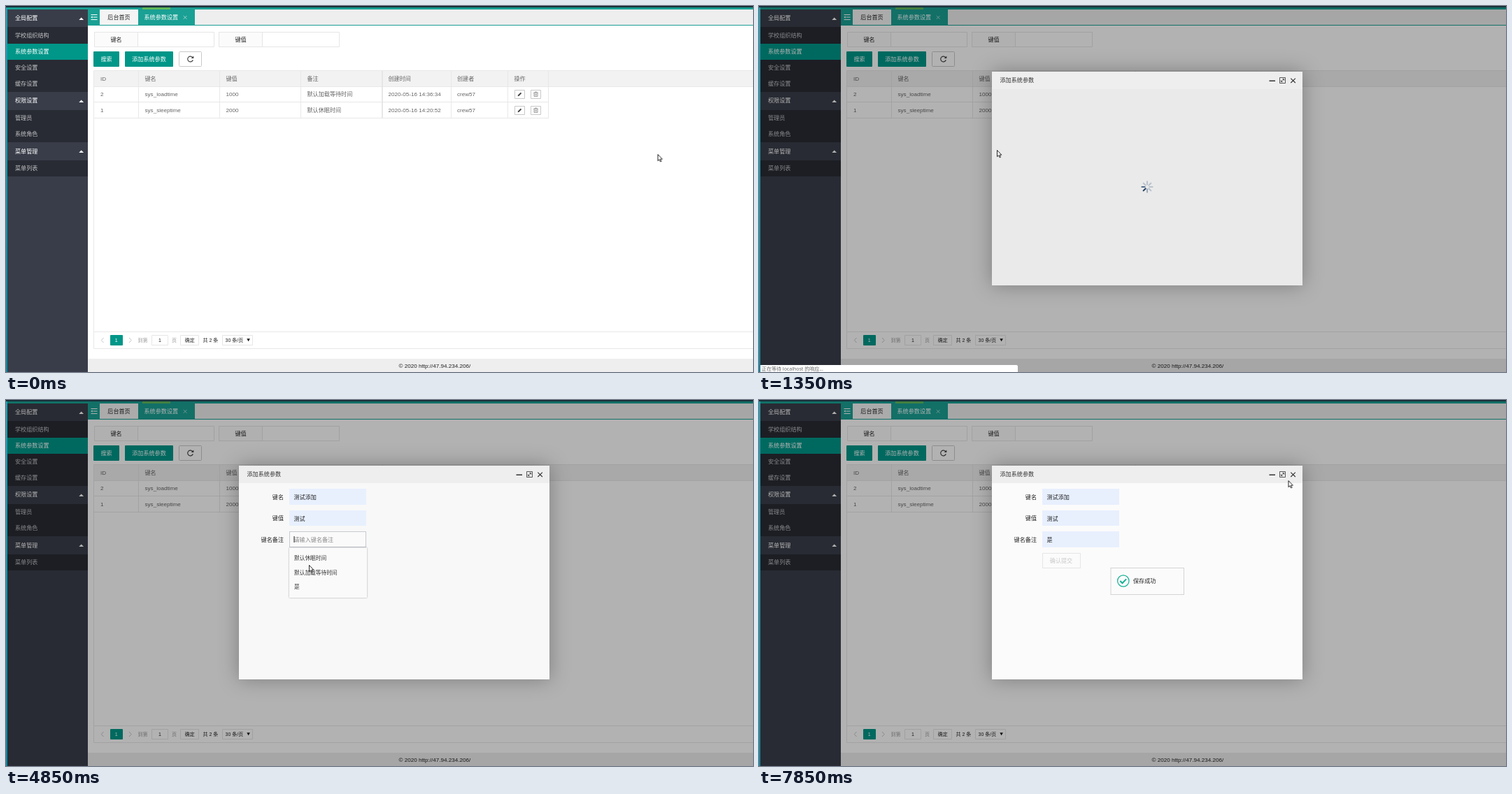
Write an HTML page that moves like this. It is 1068x524 px and loops after 8 s.

```html
<!DOCTYPE html>
<html lang="zh-CN">
<head>
<meta charset="utf-8">
<title>系统参数设置</title>
<style>
html, body { margin: 0; width: 100%; height: 100%; overflow: hidden; background: #fff; }
svg { display: block; width: 1068px; height: 524px; }
text { font: 8.1px "Liberation Sans", "Noto Sans CJK SC", "Noto Sans CJK", sans-serif; fill: #666; white-space: pre; }
.m { text-anchor: middle; }
.e { text-anchor: end; }
.b { font-weight: 500; }
.w text, text.w { fill: #fff; }
.k text, text.k { fill: #222; }
.sub text { fill: #c2c3c6; }
.sm text { font-size: 7px; }
.ph { fill: #8a8a8a; }
.ui text { font-family: "Noto Sans", "Noto Sans CJK SC", "Noto Sans CJK", sans-serif; font-size: 7.7px; fill: #333; }
.box { fill: #fff; stroke: #e6e6e6; }
.teal { fill: #009688; }
.line { fill: none; stroke: #e8e8e8; }
.auto { fill: #e8f0fe; }
.focus { fill: none; stroke: #c6cad0; }
.caret { fill: #222; }
.pop { fill: #fafafa; filter: drop-shadow(0 .6px 1px rgba(0,0,0,.35)); }
.pick { fill: #e9e9e9; }
.ico { fill: none; stroke: #333; stroke-width: 1.1; }

.t { opacity: 0; animation: 8s step-end infinite; }
#mask { animation-name: mask; }
#dialog { transform-origin: 555px 247px; animation-name: dialog; }
#wait, #status { animation-name: wait; }
#form { animation-name: form; }
#row { animation-name: row; }
#add { animation: add 8s step-end infinite; }
#drop1 { animation-name: drop1; }
#caret1 { animation-name: caret1; }
#pick1 { animation-name: pick1; }
#fill1 { animation-name: fill1; }
#drop2 { animation-name: drop2; }
#caret2 { animation-name: caret2; }
#pick2 { animation-name: pick2; }
#fill2 { animation-name: fill2; }
#drop3 { animation-name: drop3; }
#focus3 { animation-name: focus3; }
#caret3 { animation-name: caret3; }
#caret4 { animation-name: caret4; }
#pick3 { animation-name: pick3; }
#fill3 { animation-name: fill3; }
#submit { animation: submit 8s step-end infinite; }
#sent { animation-name: sent; }
#toast { animation-name: toast; }
#cursor { animation: move 8s step-end infinite; }
#arrow { animation: arrow 8s step-end infinite; }
#hand { animation-name: hand; }
#beam { animation-name: beam; }

@keyframes mask { 13.75% { opacity: 1 } 100% { opacity: 1 } }
@keyframes dialog {
  13.75% { opacity: .8; transform: scale(.87) }
  16.875%, 100% { opacity: 1; transform: scale(1) }
}
@keyframes wait { 13.75% { opacity: 1 } 20% { opacity: 0 } }
@keyframes form { 20%, 100% { opacity: 1 } }
@keyframes row { 7.5% { opacity: 1 } 10.625% { opacity: .55 } 13.75% { opacity: 0 } }
@keyframes add { 10.625% { opacity: .8 } 13.75% { opacity: 1 } }
@keyframes drop1 { 26.25% { opacity: 1 } 38.75% { opacity: 0 } }
@keyframes caret1 { 26.25% { opacity: 1 } 35.625% { opacity: 0 } }
@keyframes pick1 { 35.625% { opacity: 1 } 38.75% { opacity: 0 } }
@keyframes fill1 { 35.625%, 100% { opacity: 1 } }
@keyframes drop2 { 45% { opacity: 1 } 54.375% { opacity: 0 } }
@keyframes caret2 { 45% { opacity: 1 } 51.25% { opacity: 0 } }
@keyframes pick2 { 51.25% { opacity: 1 } 54.375% { opacity: 0 } }
@keyframes fill2 { 51.25%, 100% { opacity: 1 } }
@keyframes drop3 { 57.5% { opacity: 1 } 66.875% { opacity: 0 } }
@keyframes focus3 { 57.5% { opacity: 1 } 79.375% { opacity: 0 } }
@keyframes caret3 { 57.5% { opacity: 1 } 63.75% { opacity: 0 } }
@keyframes caret4 { 66.875% { opacity: 1 } 79.375% { opacity: 0 } }
@keyframes pick3 { 63.75% { opacity: 1 } 66.875% { opacity: 0 } }
@keyframes fill3 { 63.75%, 100% { opacity: 1 } }
@keyframes submit { 76.25% { opacity: .8 } 79.375%, 100% { opacity: 0 } }
@keyframes sent { 79.375%, 100% { opacity: 1 } }
@keyframes toast { 82.5%, 100% { opacity: 1 } }
@keyframes arrow {
  10.625% { opacity: 0 } 13.75% { opacity: 1 }
  26.25% { opacity: 0 } 32.5% { opacity: 1 }
  41.875% { opacity: 0 } 48.125% { opacity: 1 }
  57.5% { opacity: 0 } 60.625% { opacity: 1 }
  73.125% { opacity: 0 } 79.375% { opacity: 1 }
}
@keyframes hand { 10.625% { opacity: 1 } 13.75% { opacity: 0 } 73.125% { opacity: 1 } 79.375% { opacity: 0 } }
@keyframes beam {
  26.25% { opacity: 1 } 32.5% { opacity: 0 }
  41.875% { opacity: 1 } 48.125% { opacity: 0 }
  57.5% { opacity: 1 } 60.625% { opacity: 0 }
}
@keyframes move {
  0% { transform: translate(931.5px, 212px) }
  1.25% { transform: translate(880px, 228px) }
  4.375% { transform: translate(688px, 262px) }
  7.5% { transform: translate(290px, 124px) }
  10.625% { transform: translate(212px, 73px) }
  13.75% { transform: translate(279.5px, 174px) }
  16.875% { transform: translate(340px, 206px) }
  20% { transform: translate(391px, 222px) }
  23.125% { transform: translate(418px, 160px) }
  26.25% { transform: translate(427px, 136px) }
  29.375% { transform: translate(427px, 140px) }
  32.5% { transform: translate(427px, 168px) }
  35.625% { transform: translate(428px, 203px) }
  38.75% { transform: translate(430px, 196px) }
  41.875% { transform: translate(433px, 174px) }
  45% { transform: translate(433.5px, 174.5px) }
  48.125% { transform: translate(432px, 208px) }
  51.25% { transform: translate(431px, 234px) }
  54.375% { transform: translate(432px, 224px) }
  57.5% { transform: translate(434px, 202px) }
  60.625% { transform: translate(433px, 236px) }
  63.75% { transform: translate(432px, 264px) }
  66.875% { transform: translate(432px, 264px) }
  70% { transform: translate(432px, 254px) }
  73.125% { transform: translate(432px, 238px) }
  76.25% { transform: translate(432px, 238px) }
  79.375% { transform: translate(440px, 246px) }
  82.5% { transform: translate(490px, 268px) }
  85.625% { transform: translate(565px, 281px) }
  88.75% { transform: translate(668px, 230px) }
  91.875% { transform: translate(735.5px, 168px) }
  95% { transform: translate(750px, 133px) }
  98.125%, 100% { transform: translate(756.5px, 115px) }
}
</style>
</head>
<body>
<svg viewBox="0 0 1068 524">
<defs>
  <linearGradient id="edge" x2="0" y2="1">
    <stop offset="0" stop-color="#1d9fb4"/><stop offset="1" stop-color="#0b86a0"/>
  </linearGradient>
  <g id="ops">
    <g fill="#fff" stroke="#c9c9c9"><path d="M727.5 5.5h14v12h-14zM750.5 5.5h14v12h-14z"/></g>
    <path d="M731.6 14.3l.6-2 3.6-3.6 1.4 1.4-3.6 3.6z" fill="#444"/>
    <path d="M754.2 9.2h6.6M756.3 9v-1h2.4v1M755 9.4v5h5v-5M756.7 10.5v2.8M758.3 10.5v2.8" fill="none" stroke="#777" stroke-width=".7"/>
  </g>
  <path id="up" d="M-3.4 2L0-1.6 3.4 2z" fill="#fff"/>
  <path id="spoke" d="M0-3.4V-7.6" stroke-width="2.1" stroke-linecap="round"/>
</defs>

<rect width="1068" height="524" fill="#fff"/>

<!-- tabs -->
<rect x="117" y="5" width="951" height="22" fill="#eee"/>
<rect x="117" y="27" width="951" height="1" fill="#1aa094"/>
<rect x="117" y="5" width="17" height="23" fill="#1aa094"/>
<path d="M121.5 12.5h9M124.5 16h6M121.5 19.5h9" stroke="#fff" stroke-width="1.1"/>
<path d="M123.6 14.2v3.6l-2.2-1.8z" fill="#fff"/>
<rect x="134" y="5" width="55" height="22" fill="#f4f4f4"/>
<text class="k m" x="161.5" y="19">后台首页</text>
<rect x="189" y="5" width="81" height="23" fill="#1aa094"/>
<text class="w" x="197.5" y="19">系统参数设置</text>
<path d="M253.7 14l4.8 4.8m0-4.8l-4.8 4.8" stroke="#a9d9d4" stroke-width=".9"/>

<!-- search form -->
<g class="box">
  <path d="M126.5 37.5h171v21h-171zM304.5 37.5h172v21h-172z"/>
  <path d="M126.5 37.5h62v21h-62zM304.5 37.5h62v21h-62z" fill="#fbfbfb"/>
</g>
<text class="k m b" x="157.5" y="51">键名</text>
<text class="k m b" x="335.5" y="51">键值</text>
<rect class="teal" x="125" y="65" width="37" height="22" rx="1"/>
<text class="w m b" x="143.5" y="79">搜索</text>
<g id="add">
  <rect class="teal" x="170" y="65" width="69" height="22" rx="1"/>
  <text class="w m b" x="204.5" y="79">添加系统参数</text>
</g>
<rect x="247.5" y="65.5" width="32" height="21" rx="1" fill="#fff" stroke="#c9c9c9"/>
<path d="M267 74a3.9 3.9 0 1 0 .3 3.2" fill="none" stroke="#444" stroke-width="1.2"/>
<path d="M268.3 71.4v3.6h-3.6z" fill="#444"/>

<!-- table -->
<rect x="126" y="93" width="942" height="22" fill="#f2f2f2"/>
<rect id="row" class="t" x="126" y="115" width="650" height="23" fill="#f2f2f2"/>
<g class="line">
  <path d="M1068 92.5H125.5v398H1068M126 466.5h942M126 115.5h942M126 137.5h650M126 160.5h650"/>
  <path d="M189.5 93v67M305.5 93v67M421.5 93v67M636.5 93v67M717.5 93v67M775.5 93v67"/>
  <path d="M538 93v67" stroke="#e2e2e2" stroke-width="1.6"/>
</g>
<text x="135" y="107">ID</text><text x="198.5" y="107">键名</text><text x="314.5" y="107">键值</text>
<text x="430.5" y="107">备注</text><text x="546.5" y="107">创建时间</text><text x="645" y="107">创建者</text><text x="726.5" y="107">操作</text>
<text x="135" y="129.3">2</text><text x="198.5" y="129.3">sys_loadtime</text><text x="314.5" y="129.3">1000</text>
<text x="430.5" y="129.3">默认加载等待时间</text><text x="546.5" y="129.3">2020-05-16 14:36:34</text><text x="645" y="129.3">crew57</text>
<text x="135" y="151.8">1</text><text x="198.5" y="151.8">sys_sleeptime</text><text x="314.5" y="151.8">2000</text>
<text x="430.5" y="151.8">默认休眠时间</text><text x="546.5" y="151.8">2020-05-16 14:20:52</text><text x="645" y="151.8">crew57</text>
<use href="#ops" y="115"/><use href="#ops" y="138"/>

<!-- pager -->
<g class="sm">
  <path d="M139.5 475l-3.2 3.5 3.2 3.5M176 475l3.2 3.5-3.2 3.5" fill="none" stroke="#c4c4c4"/>
  <rect class="teal" x="149" y="471" width="18" height="15" rx="1"/>
  <text class="w m" x="157.8" y="481">1</text>
  <g class="box"><path d="M208.5 471.5h23v14h-23zM249.5 471.5h26v14h-26zM309.5 471.5h43v14h-43z"/></g>
  <text x="188.5" y="481" style="fill:#999">到第</text><text x="237" y="481" style="fill:#999">页</text>
  <text class="k m" x="220" y="481">1</text><text class="k m" x="262.8" y="481">确定</text>
  <text class="k" x="281.5" y="481">共 2 条</text><text class="k" x="313.5" y="481">30 条/页</text>
  <path d="M344.3 476.3h4.6l-2.3 4z" fill="#111"/>
</g>

<rect x="117" y="505" width="951" height="19" fill="#eee"/>
<text class="k m" x="612.8" y="518.3">© 2020 http://47.94.234.206/</text>

<!-- sidebar -->
<rect x="2" y="5" width="115" height="519" fill="#393d49"/>
<path d="M2 30h115v93H2zM2 149h115v46H2zM2 221h115v23H2z" fill="#282b33"/>
<rect class="teal" x="2" y="54" width="115" height="23"/>
<g class="w b">
  <text x="13" y="20">全局配置</text><text x="13" y="138.3">权限设置</text><text x="13" y="210.8">菜单管理</text>
  <text x="13" y="68">系统参数设置</text>
</g>
<g class="sub">
  <text x="13" y="45">学校组织结构</text><text x="13" y="91">安全设置</text><text x="13" y="114.3">缓存设置</text>
  <text x="13" y="163">管理员</text><text x="13" y="186.3">系统角色</text><text x="13" y="235">菜单列表</text>
</g>
<use href="#up" x="107.7" y="18"/><use href="#up" x="107.7" y="136"/><use href="#up" x="107.7" y="208"/>

<rect width="1068" height="2" fill="#17303a"/>
<rect y="2" width="1068" height="3" fill="#1aa094"/>
<rect x="195" y="2" width="40" height="3" fill="#5fb85c"/>
<rect id="mask" class="t" x="2" y="2" width="1066" height="522" fill="#000" fill-opacity=".3"/>
<rect y="2" width="2" height="522" fill="url(#edge)"/>

<g id="status" class="t ui">
  <path d="M2 524v-10h366q2 0 2 2v8z" fill="#fff"/>
  <text x="4" y="522.3" style="font-size:7px;fill:#666">正在等待 localhost 的响应...</text>
</g>

<g id="dialog" class="t">
  <rect x="333" y="94" width="444" height="306" fill="#eaeaea" style="filter:drop-shadow(.6px .6px 14.5px rgba(0,0,0,.3))"/>
  <rect x="333" y="94" width="444" height="25" fill="#eee"/>
  <text x="344.5" y="109" style="fill:#333">添加系统参数</text>
  <g class="ico">
    <path d="M729.5 107.2h8.5" stroke-width="1.5"/>
    <path d="M744.5 102.5h8v8h-8zM746.6 108.4l3.9-3.9M748.3 104.4h2.4v2.4M746.4 106.3v2.3h2.3" stroke-width=".8"/>
    <path d="M760.3 103.6l6.6 6.4m0-6.4l-6.6 6.4"/>
  </g>
  <g id="wait" class="t">
    <g transform="translate(555 259)" stroke="#b9c3cd">
      <use href="#spoke"/><use href="#spoke" transform="rotate(45)"/><use href="#spoke" transform="rotate(90)"/>
      <use href="#spoke" transform="rotate(135)"/><use href="#spoke" transform="rotate(180)" stroke="#9eacba"/>
      <use href="#spoke" transform="rotate(225)" stroke="#243f63"/><use href="#spoke" transform="rotate(270)" stroke="#55708d"/>
      <use href="#spoke" transform="rotate(315)"/>
    </g>
  </g>

  <g id="form" class="t">
    <rect x="333" y="119" width="444" height="281" fill="#f8f8f8"/>
    <rect id="sent" class="t" x="333" y="119" width="444" height="281" fill="#fbfbfb"/>
    <g class="k e b"><text x="397" y="141.6">键名</text><text x="397" y="172.3">键值</text><text x="397" y="202.8">键名备注</text></g>
    <path class="box" style="fill:#fafafa" d="M405.5 127.5h109v22h-109zM405.5 158.5h109v21h-109zM405.5 188.5h109v22h-109z"/>
    <text class="ph" x="411.5" y="141.6">请输入键名</text>
    <text class="ph" x="411.5" y="172.3">请输入键值</text>
    <text class="ph" x="411.5" y="202.8">请输入键名备注</text>
    <rect x="405.5" y="219.5" width="54" height="21" fill="#fbfbfb" stroke="#e6e6e6"/>
    <text class="m" x="432" y="233.3" style="fill:#c9c9c9">确认提交</text>
    <g id="submit">
      <rect class="teal" x="405" y="219" width="54" height="22" rx="1"/>
      <text class="w m b" x="431.8" y="233.3">确认提交</text>
    </g>

    <g id="fill1" class="t"><rect class="auto" x="405" y="127" width="110" height="23"/><text class="k" x="411.5" y="141.8">测试添加</text></g>
    <g id="fill2" class="t"><rect class="auto" x="405" y="158" width="110" height="22"/><text class="k" x="411.5" y="172.5">测试</text></g>
    <g id="fill3" class="t"><rect class="auto" x="405" y="188" width="110" height="23"/><text class="k" x="411.5" y="203">是</text></g>
    <rect id="focus3" class="t focus" x="405.5" y="188.5" width="109" height="22"/>
    <rect id="caret1" class="t caret" x="411.5" y="134" width="1" height="9"/>
    <rect id="caret2" class="t caret" x="411.5" y="164" width="1" height="10"/>
    <rect id="caret3" class="t caret" x="411.5" y="195" width="1" height="9"/>
    <rect id="caret4" class="t caret" x="420" y="195" width="1" height="10"/>

    <g id="drop1" class="t ui">
      <rect class="focus" x="405.5" y="127.5" width="109" height="22"/>
      <rect class="pop" x="405" y="150" width="111" height="71.5"/>
      <rect id="pick1" class="t pick" x="405" y="195.5" width="111" height="20.5"/>
      <text x="412" y="167.3">sys_sleeptime</text><text x="412" y="187.9">sys_loadtime</text><text x="412" y="208.6">测试添加</text>
    </g>
    <g id="drop2" class="t ui">
      <rect class="focus" x="405.5" y="158.5" width="109" height="21"/>
      <rect class="pop" x="405" y="180.5" width="111" height="71.5"/>
      <rect id="pick2" class="t pick" x="405" y="226" width="111" height="20.5"/>
      <text x="412" y="197.9">2000</text><text x="412" y="218.5">1000</text><text x="412" y="239.2">测试</text>
    </g>
    <g id="drop3" class="t ui">
      <rect class="pop" x="405" y="211.5" width="111" height="71.5"/>
      <rect id="pick3" class="t pick" x="405" y="257" width="111" height="20.5"/>
      <text x="412" y="228.9">默认休眠时间</text><text x="412" y="249.5">默认加载等待时间</text><text x="412" y="270.2">是</text>
    </g>
  </g>

  <g id="toast" class="t">
    <rect x="503" y="240.5" width="104.5" height="38" fill="#fbfbfb" stroke="#d3d4d3"/>
    <circle cx="520.8" cy="259" r="8.2" fill="none" stroke="#16b095" stroke-width="1.2"/>
    <path d="M516.3 259l3.2 3.2 5.6-5.8" fill="none" stroke="#16b095" stroke-width="2"/>
    <text class="k" x="535" y="262.2">保存成功</text>
  </g>
</g>

<g id="cursor" fill="#fff" stroke="#111" stroke-width=".9" stroke-linejoin="round">
  <path id="arrow" d="M.5.5v9.2l2.1-1.9 1.5 3.2 1.4-.6-1.5-3.2h2.8z"/>
  <path id="hand" class="t" d="M.3 8.6V1.2q.9-1.4 1.8 0v3.7q1-.6 1.7.3 1-.5 1.6.4 1.2-.2 1.2 1v2.9L5.5 13H.8L-2.6 8.4q-.2-1.3 1.1-1z"/>
  <path id="beam" class="t" fill="none" d="M-2-4.6h1.4L0-4.2l.6-.4H2M0-4.2v8.4M-2 4.6h1.4L0 4.2l.6.4H2"/>
</g>
</svg>
</body>
</html>
```
